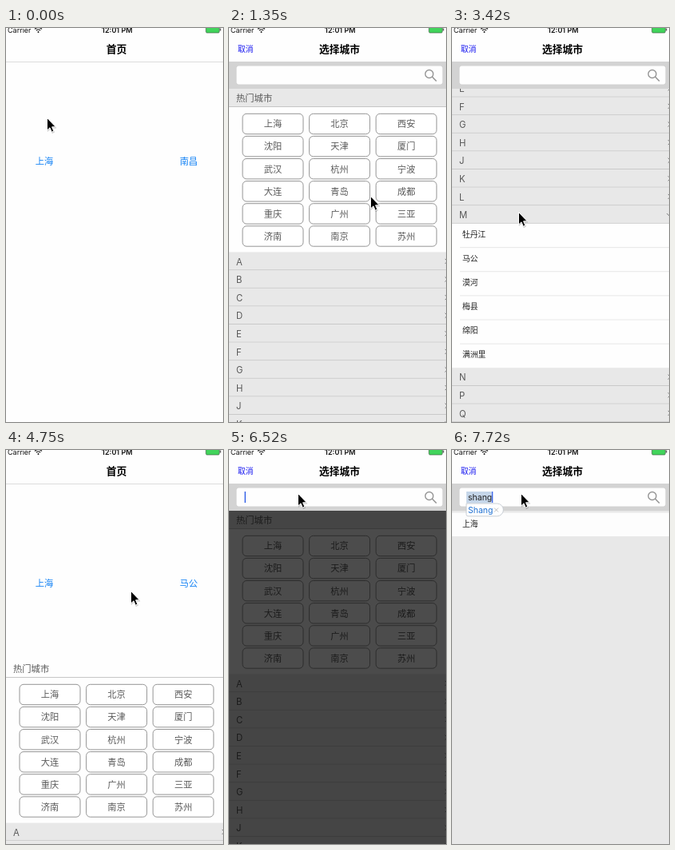
Animation of 272 by 493 pixels, one loop 8000 ms. Source, as an HTML page:

```html
<!DOCTYPE html>
<html lang="zh">
<head>
<meta charset="utf-8">
<title>选择城市</title>
<style>
html, body { margin: 0; width: 100%; height: 100%; overflow: hidden; background: #fefefe; }
svg { display: block; width: 100vw; height: 100vh; }
text { font-family: Inter, "Noto Sans CJK SC", "Noto Sans CJK", sans-serif; white-space: pre; }
</style>
</head>
<body>
<svg id="stage" viewBox="0 0 272 493"></svg>
<script>
const NS = 'http://www.w3.org/2000/svg';
const stage = document.getElementById('stage');
const TICK = 148, LOOP = 8000;
const ROW = 22.6, CITY = 30.1, LIST_TOP = 280.6;
const GREY = '#e8e8e8', LINE = '#c6c6c6', INK = '#5a5a5a';

function add(parent, tag, attrs = {}) {
  const el = document.createElementNS(NS, tag);
  for (const k in attrs) el.setAttribute(k, attrs[k]);
  parent.appendChild(el);
  return el;
}
const group = parent => add(parent, 'g');
const rect = (p, x, y, width, height, fill, more) =>
  add(p, 'rect', { x, y, width, height, fill, ...more });
const path = (p, d, stroke, width, more) =>
  add(p, 'path', { d, fill: 'none', stroke, 'stroke-width': width, ...more });
// y is the middle of the glyphs
function label(p, str, x, y, size, fill, more) {
  const el = add(p, 'text', { x, y: y + size * 0.37, 'font-size': size, fill, ...more });
  el.textContent = str;
  return el;
}
const MID = { 'text-anchor': 'middle' };
const BOLD = { ...MID, 'font-weight': 600 };

// Home page
const home = group(stage);
rect(home, 0, 0, 272, 493, '#fefefe');
rect(home, 0, 42, 272, 1, '#dcdcdc');
label(home, '首页', 138.5, 26.5, 12.8, '#000', BOLD);
label(home, '上海', 48, 167, 11.3, '#1583f5', MID);
const pick = label(home, '南昌', 229, 167, 11.3, '#1583f5', MID);

// City page
const page = group(stage);
rect(page, 0, 0, 272, 493, GREY);
const list = group(page);
rect(list, 0, 98, 272, 1, LINE);
rect(list, 0, 99, 272, 181.6, '#fefefe');
label(list, '热门城市', 9, 87.5, 11.3, INK);
const hot = '上海 北京 西安 沈阳 天津 厦门 武汉 杭州 宁波 大连 青岛 成都 重庆 广州 三亚 济南 南京 苏州'.split(' ');
hot.forEach((name, i) => {
  const x = 17 + (i % 3) * 83.6, y = 107.3 + Math.floor(i / 3) * 28.1;
  rect(list, x, y, 76, 25.4, '#fff', { rx: 5, stroke: '#8a8a8a', 'stroke-width': 0.9 });
  label(list, name, x + 38, y + 12.9, 11.3, INK, MID);
});

const letters = 'ABCDEFGHJKLMNPQRSTWXYZ#';
const openAt = letters.indexOf('M');
const openY = LIST_TOP + (openAt + 1) * ROW;
const upper = group(list), cities = group(list), lower = group(list);
let arrow;
[...letters].forEach((ch, i) => {
  const g = i > openAt ? lower : upper, y = LIST_TOP + i * ROW, mid = y + ROW / 2;
  rect(g, 0, y, 272, ROW, GREY);
  rect(g, 0, y + ROW - 0.9, 272, 0.9, LINE);
  label(g, ch, 9, mid + 0.6, 11.3, INK);
  const a = path(g, `M270.8 ${mid - 3}l3 3l-3 3`, '#777', 1);
  if (i === openAt) arrow = a;
});
const names = ['牡丹江', '马公', '漠河', '梅县', '绵阳', '满洲里'];
rect(cities, 0, openY, 272, names.length * CITY, '#fefefe');
names.forEach((name, i) => {
  const y = openY + i * CITY;
  label(cities, name, 13, y + 13.4, 9.8, '#222');
  if (i < names.length - 1) rect(cities, 10, y + CITY - 0.6, 262, 0.8, '#e2e2e2');
});

const dim = rect(page, 0, 76, 272, 417, '#000');
const results = group(page);
rect(results, 0, 75, 272, 418, GREY);
rect(results, 0, 78.5, 272, 29.5, '#fdfdfd');
label(results, '上海', 13, 92.5, 9.8, '#222');

rect(page, 0, 0, 272, 43, '#fefefe');
label(page, '取消', 11, 26.5, 9.8, '#1414f0');
label(page, '选择城市', 138.5, 26.5, 12.8, '#000', BOLD);
rect(page, 0, 42, 272, 34, '#d3d3d3');
rect(page, 9.5, 47.5, 258, 23, '#fefefe', { rx: 3 });
add(page, 'circle', { cx: 251, cy: 57.5, r: 5, fill: 'none', stroke: '#959595', 'stroke-width': 1.4 });
path(page, 'M254.8 61.3L260 66.5', '#959595', 1.6);

const mark = rect(page, 18, 52, 31.5, 14.5, '#c5d6e9');
const typed = label(page, '', 20, 59, 10.5, '#222');
const caret = rect(page, 19.5, 52, 1.5, 14, '#3d68e8');
const bubble = group(page);
path(bubble, 'M18 67H56.5a7.8 7.8 0 0 1 0 15.8H20a2 2 0 0 1 -2 -2Z', '#bcc3cb', 0.8, { fill: '#fff' });
label(bubble, 'Shang', 20, 75, 10.5, '#2272d2');
path(bubble, 'M53 72.5l5 5m0 -5l-5 5', '#aaa', 0.8);

// Status bar
const bar = group(stage);
label(bar, 'Carrier', 2, 2.5, 9, '#111');
label(bar, '12:01 PM', 139.3, 2.5, 9, '#111', BOLD);
path(bar, 'M36 1.4a6.4 6.4 0 0 1 9 0M37.8 3.2a3.8 3.8 0 0 1 5.4 0', '#111', 1.1);
add(bar, 'circle', { cx: 40.5, cy: 5, r: 1, fill: '#111' });
rect(bar, 250.7, -2, 16.6, 8, '#41d45b', { rx: 1.2, stroke: '#3a5c40', 'stroke-width': 0.7 });
rect(bar, 268.2, 0.5, 1.1, 3, '#333');

// Pointer
const pointer = group(stage);
const shape = 'M0.5 0.5V16L4 12.8L6.3 18.2L8.9 17.1L6.6 11.8H11.3Z';
path(pointer, shape, '#000', 1, { transform: 'translate(0.6 1.3)', fill: '#000', opacity: 0.18 });
path(pointer, shape, '#fff', 1, { fill: '#000' });

// Tables of [tick, ...values]
const POINTER = [[0, 51, 112], [1, 62, 115], [3, 150, 145], [5, 227, 168], [7, 227, 168],
  [8, 212, 184], [9, 177, 210], [12, 105, 223], [14, 85, 224], [17, 85, 222], [20, 83, 228],
  [21, 83, 230], [24, 83, 230], [27, 55, 284], [29, 58, 282], [32, 156, 176], [33, 176, 173],
  [36, 227, 168], [39, 224, 164], [42, 92, 60], [43, 86, 54]];
const SLIDE = [[6, 493], [7, 330], [8, 60], [9, 0], [27, 0], [28, 50], [29, 290], [30, 450],
  [31, 493], [37, 493], [38, 330], [39, 60], [40, 0]];
const SCROLL = [[14, 0], [15, 45], [16, 210], [17, 311.5], [18, 309.5], [19, 307.6], [20, 307],
  [32, 307], [33, 0]];
const OPEN = [[20, 0], [21, 0.25], [22, 0.8], [23, 1], [32, 1], [33, 0]];
const DIM = [[42, 0], [43, 0.4], [44, 0.7]];

function at(table, n) {
  const i = table.findIndex(k => k[0] > n);
  if (i === 0) return table[0].slice(1);
  if (i < 0) return table[table.length - 1].slice(1);
  const a = table[i - 1], b = table[i], f = (n - a[0]) / (b[0] - a[0]);
  return a.slice(1).map((v, j) => v + (b[j + 1] - v) * f);
}
const move = (el, x, y) => el.setAttribute('transform', `translate(${x} ${y})`);
const show = (el, on) => el.setAttribute('visibility', on ? 'visible' : 'hidden');

function draw(ms) {
  const n = Math.floor((ms % LOOP) / TICK);
  const open = at(OPEN, n)[0];
  move(pointer, ...at(POINTER, n));
  move(page, 0, at(SLIDE, n)[0]);
  move(list, 0, -at(SCROLL, n)[0]);
  move(lower, 0, open * names.length * CITY);
  show(cities, open > 0);
  const mid = openY - ROW / 2;
  arrow.setAttribute('transform', `rotate(${open * 90} 272.3 ${mid})`);

  pick.textContent = n < 28 ? '南昌' : '马公';
  const pressed = n === 5 || n === 6 || n === 36 || n === 37;
  pick.setAttribute('opacity', pressed ? 0.25 : 1);

  dim.setAttribute('opacity', at(DIM, n)[0]);
  const word = 'shang'.slice(0, Math.max(0, Math.min(5, n - 47)));
  typed.textContent = word;
  show(results, word);
  show(mark, word.length === 5);
  show(bubble, word.length === 5);
  show(caret, n >= 43);
  caret.setAttribute('x', word ? 19.5 + typed.getComputedTextLength() : 19.5);
}

const start = performance.now();
function loop() {
  draw(performance.now() - start);
  requestAnimationFrame(loop);
}
loop();
</script>
</body>
</html>
```
